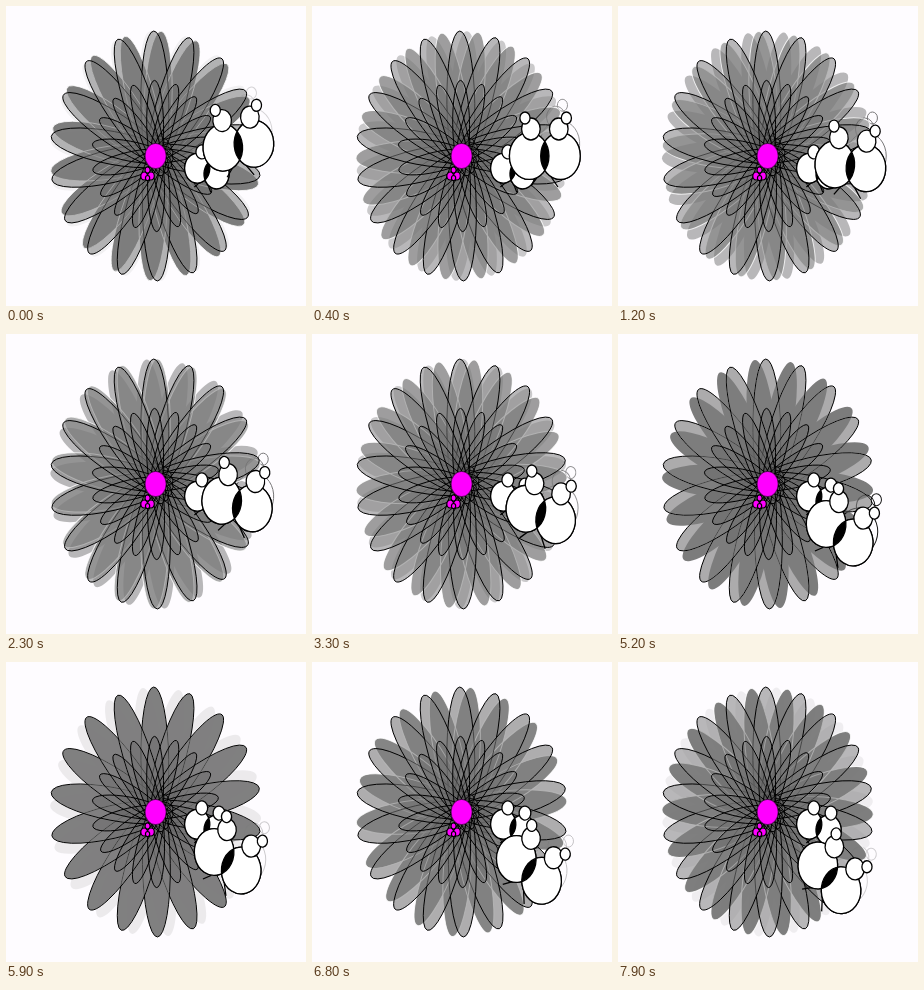
An HTML page for the animation above (8000 ms loop, 300x300 px).

```html
<!DOCTYPE html>
<html lang="en">
<head>
<meta charset="utf-8">
<title>Flower clock</title>
<style>
  html, body { margin: 0; width: 100%; height: 100%; overflow: hidden; background: #fefcff; }
  svg { display: block; width: 100vw; height: 100vh; }
  svg * { vector-effect: non-scaling-stroke; }
</style>
</head>
<body>
<svg viewBox="0 0 300 300">
  <g id="dial" transform="translate(149.6 150) scale(.845 1)"></g>
</svg>
<script>
const LOOP = 8000;
const TICKS = [100, 1000, 2100, 3000, 4000, 5200, 6200, 7100];
const STEP = 6;
const PETALS = 18;
const TILT = -1;
const dial = document.getElementById('dial');

function add(parent, tag, attrs) {
  const el = document.createElementNS('http://www.w3.org/2000/svg', tag);
  for (const name in attrs) el.setAttribute(name, attrs[name]);
  parent.appendChild(el);
  return el;
}

// Petals reach past the middle, which weaves the dark mesh there.
function flower(size, style) {
  const g = add(dial, 'g', { transform: `rotate(${TILT})`, ...style });
  for (let i = 0; i < PETALS; i++) {
    add(g, 'ellipse', {
      cy: -52 * size, rx: 16.5 * size, ry: 73 * size,
      transform: `rotate(${i * 360 / PETALS})`
    });
  }
  return g;
}

const ring = (x, r) => `M${x - r} 0a${r} ${r} 0 1 0 ${2 * r} 0a${r} ${r} 0 1 0 ${-2 * r} 0`;

// A pair of overlapping discs with a dark lens, feelers above and legs below.
function hand(parent, tips, style) {
  const g = add(parent, 'g', { stroke: '#000', 'stroke-width': 1.3, fill: '#fff', ...style });
  add(g, 'path', { d: 'M82 30L98 11L114 31', fill: 'none' });
  for (const x of [80, 117]) add(g, 'circle', { cx: x, r: 23.4, fill: '#000' });
  add(g, 'path', { d: ring(80, 23.4) + ring(117, 23.4), 'fill-rule': 'evenodd' });
  for (const x of [82, 115]) add(g, 'circle', { cx: x, cy: -27, r: 11 });
  if (tips) for (const x of [75, 124]) add(g, 'circle', { cx: x, cy: -38, r: 6 });
  return g;
}

const oldFlower = flower(1, { fill: '#777' });
const oldHand = add(dial, 'g', { fill: 'none', stroke: '#000', 'stroke-width': 1 });
for (const [cx, cy, r] of [[117, 0, 23.4], [115, -27, 11], [124, -38, 6]]) {
  add(oldHand, 'circle', { cx, cy, r });
}

const newFlower = flower(1, { fill: '#777' });
const newEdges = flower(1, { fill: 'none', stroke: '#fff', 'stroke-width': 1, opacity: .8 });
flower(1, { fill: '#808080', 'fill-opacity': .55, stroke: '#000', 'stroke-width': 1 });
flower(.605, { fill: '#000', 'fill-opacity': .08, stroke: '#000', 'stroke-width': 1 });

add(dial, 'ellipse', { rx: 12.4, ry: 12.6, fill: '#f0f', stroke: '#301030', 'stroke-width': .6 });
const bud = add(dial, 'g', {
  transform: 'translate(-9.5 18)', fill: '#f0f', stroke: '#000', 'stroke-width': 1.2
});
for (const [cx, cy, r] of [[-4, 2, 4], [4, 2, 4], [0, -4, 3], [0, 4, 2.5]]) {
  add(bud, 'circle', { cx, cy, r });
}

hand(dial, false, { transform: 'rotate(14) scale(.635)' });
const secondHand = hand(dial, true, {});

const turn = (el, deg) => el.setAttribute('transform', `rotate(${deg})`);

function draw(t) {
  const done = TICKS.filter(tick => tick <= t).length;
  const since = done ? t - TICKS[done - 1] : t + 900;
  const angle = (done - 1) * STEP;
  const petals = angle - 30 + TILT;
  const fade = Math.exp(-since / 300);

  turn(secondHand, angle);
  turn(oldHand, angle - STEP);
  turn(newFlower, petals);
  turn(newEdges, petals);
  turn(oldFlower, petals - STEP);
  newFlower.setAttribute('opacity', 1 - .8 * fade);
  oldFlower.setAttribute('opacity', .04 + .92 * fade);
  oldHand.setAttribute('opacity', .12 + .8 * fade);
}

function frame(now) {
  draw(now % LOOP);
  requestAnimationFrame(frame);
}
draw(0);
requestAnimationFrame(frame);
</script>
</body>
</html>
```
